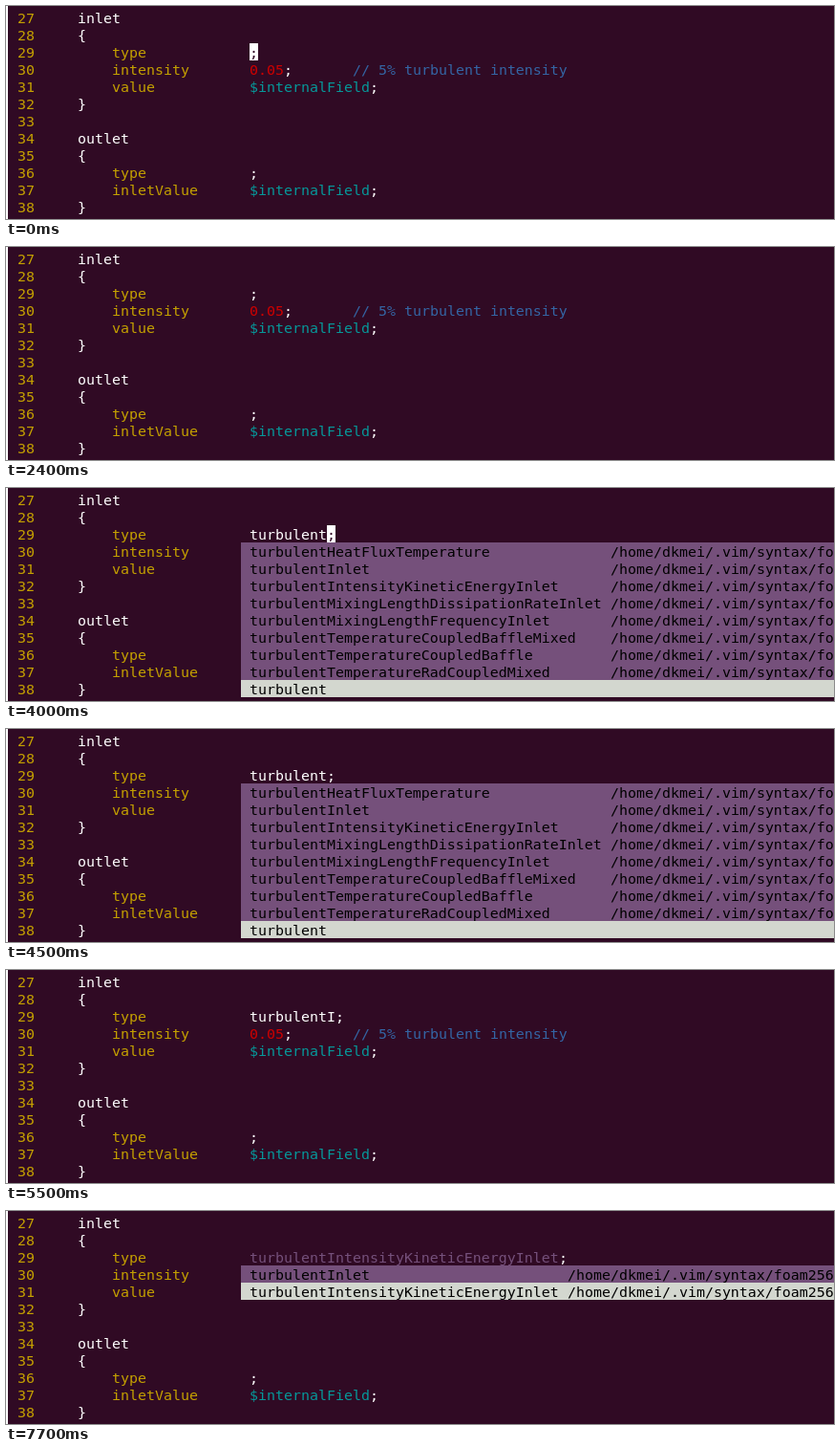
Write an HTML page that moves like this. It is 867x223 px and loops after 8 s.

```html
<!DOCTYPE html>
<html lang="en">
<head>
<meta charset="utf-8">
<title>Editor completion</title>
<style>
  html, body { margin: 0; width: 100%; height: 100%; overflow: hidden; background: #300a24; }
  svg { display: block; }
  text { font: 14.95px "DejaVu Sans Mono", monospace; white-space: pre; }
</style>
</head>
<body>
<svg width="867" height="223" viewBox="0 0 867 223">
  <rect width="867" height="223" fill="#300a24"/>
  <rect width="2" height="223" fill="#fff"/>
  <g id="file"></g>
  <g id="live"></g>
</svg>
<script>
const LOOP = 8000, CELL = 9, LINE = 18, FIRST = 27, EDIT = 29, VALUE = 28;
const BG = '#300a24', WHITE = '#fff', YELLOW = '#c4a000', RED = '#cc0000';
const CYAN = '#06989a', BLUE = '#3465a4', PURPLE = '#75507b', PALE = '#d3d7cf';

const colX = col => 3 + col * CELL;
const rowY = row => 3 + (row - FIRST) * LINE;
const text = (row, col, str, fill) =>
  `<text x="${colX(col)}" y="${rowY(row) + 15}" fill="${fill}">${str}</text>`;
const bar = (row, col, width, fill) =>
  `<rect x="${colX(col)}" y="${rowY(row)}" width="${width}" height="${LINE}" fill="${fill}"/>`;

// Each line is a list of [column, string, colour].
const field = [[VALUE, '$internalField', CYAN], [42, ';', WHITE]];
const lines = [
  [[8, 'inlet', WHITE]],
  [[8, '{', WHITE]],
  [[12, 'type', YELLOW]],
  [[12, 'intensity', YELLOW], [VALUE, '0.05', RED], [32, ';', WHITE],
   [40, '// 5% turbulent intensity', BLUE]],
  [[12, 'value', YELLOW], ...field],
  [[8, '}', WHITE]],
  [],
  [[8, 'outlet', WHITE]],
  [[8, '{', WHITE]],
  [[12, 'type', YELLOW], [VALUE, ';', WHITE]],
  [[12, 'inletValue', YELLOW], ...field],
  [[8, '}', WHITE]]
];

const path = '/home/dkmei/.vim/syntax/foam256';
const energy = 'turbulentIntensityKineticEnergyInlet';
const allTypes = {
  pathCol: 70, selected: 8,
  items: ['turbulentHeatFluxTemperature', 'turbulentInlet', energy,
    'turbulentMixingLengthDissipationRateInlet', 'turbulentMixingLengthFrequencyInlet',
    'turbulentTemperatureCoupledBaffleMixed', 'turbulentTemperatureCoupledBaffle',
    'turbulentTemperatureRadCoupledMixed', 'turbulent']
};
const inletTypes = { pathCol: 65, selected: 1, items: ['turbulentInlet', energy] };

// Typed word by start time; the cursor toggles at each time in blinks.
const steps = [
  { at: 0, word: '', blinks: [200, 700, 1300, 1800, 2400] },
  { at: 2900, word: 't', blinks: [] },
  { at: 3100, word: 'tu', blinks: [] },
  { at: 3300, word: 'tur', blinks: [3800] },
  { at: 4000, word: 'turbulent', blinks: [4500], menu: allTypes },
  { at: 5000, word: 'turbulentI', blinks: [5500] },
  { at: 6100, word: energy, blinks: [6600, 7200, 7700], menu: inletTypes, fill: PURPLE }
];

function drawMenu({ items, selected, pathCol }) {
  return items.map((name, i) => {
    const row = EDIT + 1 + i;
    const hasPath = name !== 'turbulent';
    return bar(row, VALUE - 1, 867 - colX(VALUE - 1), i === selected ? PALE : PURPLE) +
      text(row, VALUE, name, '#000') +
      (hasPath ? text(row, pathCol, path, '#000') : '');
  }).join('');
}

const live = document.getElementById('live');
let shown = '';

function render(t) {
  const step = steps.findLast(s => s.at <= t);
  const cursorOn = step.blinks.filter(b => b <= t).length % 2 === 0;
  const key = step.at + ':' + cursorOn;
  if (key === shown) return;
  shown = key;
  const end = VALUE + step.word.length;
  live.innerHTML =
    text(EDIT, VALUE, step.word, step.fill || WHITE) +
    (cursorOn ? bar(EDIT, end, CELL, WHITE) : '') +
    text(EDIT, end, ';', cursorOn ? BG : WHITE) +
    (step.menu ? drawMenu(step.menu) : '');
}

document.getElementById('file').innerHTML = lines.map((parts, i) =>
  text(FIRST + i, 1, FIRST + i, YELLOW) +
  parts.map(([col, str, fill]) => text(FIRST + i, col, str, fill)).join('')
).join('');

const start = performance.now();
function tick() {
  render((performance.now() - start) % LOOP);
  requestAnimationFrame(tick);
}
tick();
</script>
</body>
</html>
```
